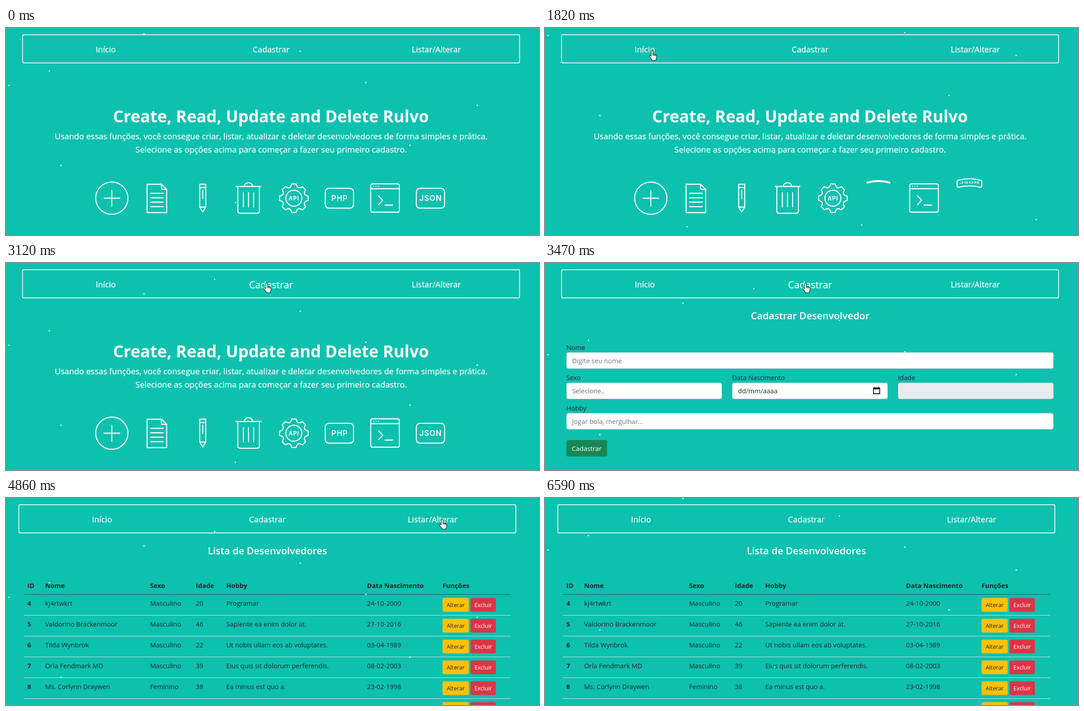
Write an HTML page that moves like this. It is 1199 by 467 pixels and loops after 6.66 s.

```html
<!DOCTYPE html>
<html lang="pt-BR">
<head>
<meta charset="utf-8">
<title>CRUD</title>
<style>
  html, body { margin: 0; width: 100%; height: 100%; overflow: hidden; background: #0dc1af; }
  svg { display: block; width: 100%; height: 100%; }
  text { font-family: "Open Sans", "Noto Sans", sans-serif; font-size: 14.75px; fill: #212529; }
  .nav, .lead { font-size: 18.45px; fill: #fff; stroke: #fff; stroke-width: .25px; }
  .nav { font-size: 18.2px; }
  .big { font-size: 36.9px; font-weight: 700; fill: #fff; }
  .head { font-size: 21.9px; font-weight: 600; fill: #fff; }
  .bold { font-weight: 700; }
  .hint { fill: #6c757d; }
  .light { fill: #fff; }
  .small { font-size: 12.9px; }
  .mid { text-anchor: middle; }
  #icons { fill: none; stroke: #fff; stroke-width: 2.3; stroke-linecap: round; stroke-linejoin: round; }
  #icons text { font-family: Inter, Roboto, sans-serif; font-weight: 600; font-size: 17px; letter-spacing: 1px; fill: #fff; stroke: none; }
  #icons .api { font-size: 12.5px; font-weight: 700; }
</style>
</head>
<body>
<svg viewBox="0 0 1199 467">
  <rect width="1199" height="467" fill="#0dc1af"/>
  <g id="nav">
    <rect x="37.3" y="15.3" width="1118" height="63.5" rx="3" fill="none" stroke="#e6f7f5" stroke-width="1.9"/>
  </g>
  <g id="home"><g id="icons"></g></g>
  <g id="form"></g>
  <g id="list"></g>
  <g id="dots" fill="#fff"></g>
  <g id="cursor" fill="#fff" stroke="#111" stroke-width="1.1" stroke-linejoin="round">
    <path id="arrow" d="M0 0V16.5L3.8 13L6.5 19L9.2 17.8L6.6 12H11.7Z"/>
    <path id="hand" d="M-2 2q0-2 2-2t2 2v6l5.5 1.3q2.5 .5 2.5 3.2v3q0 3-1.5 4.5v2h-9v-2l-5-6q-1.500-2.200 0-3q1.500-.6 3.500 1.500zM2 8v4M4.700 9v3.500M7.300 9.500v3"/>
  </g>
</svg>
<script>
const LOOP = 6660;
const $ = id => document.getElementById(id);

function add(parent, tag, attrs = {}, content = "") {
  const el = document.createElementNS("http://www.w3.org/2000/svg", tag);
  for (const k in attrs) el.setAttribute(k, attrs[k]);
  if (content) el.textContent = content;
  parent.appendChild(el);
  return el;
}
const label = (parent, x, y, str, cls = "") => add(parent, "text", { x, y, class: cls }, str);
const box = (parent, x, y, width, height, fill, rx = 4) =>
  add(parent, "rect", { x, y, width, height, fill, rx });
const repeat = (n, fn) => Array.from({ length: n }, (_, i) => fn(i)).join("");
const clamp = v => Math.max(0, Math.min(1, v));
const smooth = v => { v = clamp(v); return v * v * (3 - 2 * v); };
const show = (el, on) => el.setAttribute("display", on ? "inline" : "none");
const move = (el, x, y) => el.setAttribute("transform", `translate(${x} ${y})`);

// Navigation
const links = ["Início", "Cadastrar", "Listar/Alterar"].map((name, i) => {
  const x = 224.5 + 371.8 * i;
  return { x, el: label($("nav"), x, 55, name, "nav mid") };
});

// Home page
const home = $("home");
label(home, 596, 213, "Create, Read, Update and Delete Rulvo", "big mid");
label(home, 596.5, 250.7, "Usando essas funções, você consegue criar, listar, atualizar e deletar desenvolvedores de forma simples e prática.", "lead mid");
label(home, 596.5, 280.5, "Selecione as opções acima para começar a fazer seu primeiro cadastro.", "lead mid");

// Icons share one evenly spaced row and are drawn around their centre
const iconX = i => 238 + 102.4 * i, ICON_Y = 384;
function icon(i, d) {
  const g = add($("icons"), "g");
  move(g, iconX(i), ICON_Y);
  add(g, "path", { d });
  return g;
}

function gearPath(teeth, r) {
  const at = (radius, turn) => {
    const a = 2 * Math.PI * turn / teeth;
    return `${radius * Math.sin(a)} ${-radius * Math.cos(a)}`;
  };
  return "M" + at(r, -.2) + repeat(teeth, i => `L${at(r, i + .2)}Q${at(r * .62, i + .5)} ${at(r, i + .8)}`) + "Z";
}

add(icon(0, "M-17.5 0h35.5M0-17.5v35.5"), "circle", { r: 36.3 });
icon(1, "M-23-31.5h32.5l11.5 11.5v52.500h-44zM9.500-31.500v11.500h11.500" + repeat(4, i => `M-15 ${10 * i - 11}h28.5`));
icon(2, "M-7-31.5h13.5v51.5l-6.7 11l-6.8-11zM-7-24h13.5M-7 20h13.5M-.3-18v19");
icon(3, "M-27.7-26.5h56M-9.2-27c1-10.5 18-10.5 19 0M-23.7-26v55q0 5 5 5h38.5q5 0 5-5v-55" +
  repeat(3, i => `M${11.5 * i - 11.2}-12.5v32`));
const api = icon(4, gearPath(8, 32.5));
add(api, "circle", { r: 18 });
label(api, 0, 4.5, "API", "api mid");
const terminal = icon(6, "M-32-21.5h64.500" + repeat(3, i => `M${5.5 * i - 25.5}-27h.1`) + "M-14.500-5.500l9.500 10l-9.500 10M0 15.500h17.500");
add(terminal, "rect", { x: -32, y: -32.5, width: 64.5, height: 64, rx: 4 });

// Badges that roll around a horizontal drum
const rolls = [["PHP", 5, 705], ["JSON", 7, 640]].map(([name, slot, start]) => {
  const g = add($("icons"), "g");
  return { g, x: iconX(slot), start, frame: add(g, "path"), word: label(g, .5, 6, name, "mid") };
});

// Registration form on a three-column grid
const form = $("form");
label(form, 596.5, 126.5, "Cadastrar Desenvolvedor", "head mid");
for (const [name, hint, col, line, span] of [
  ["Nome", "Digite seu nome", 0, 0, 3],
  ["Sexo", "Selecione..", 0, 1, 1],
  ["Data Nascimento", "dd/mm/aaaa", 1, 1, 1],
  ["Idade", "", 2, 1, 1],
  ["Hobby", "Jogar bola, mergulhar...", 0, 2, 3]
]) {
  const x = 48 + 373 * col, y = 201.5 + 68.5 * line;
  label(form, x, y - 6, name);
  box(form, x + .5, y + .5, 373 * span - 24, 36, hint ? "#fff" : "#e9ecef").setAttribute("stroke", "#ced4da");
  label(form, x + 13, y + 24, hint, col ? "" : "hint");
}
add(form, "path", { d: "M739 282h14v13h-14zM739 284h14M742 279.5v3M750 279.5v3", fill: "none", stroke: "#111", "stroke-width": 1.8 });
box(form, 48, 399.5, 91.5, 37, "#198754");
label(form, 93.8, 423.5, "Cadastrar", "light mid");

// Developer table
const list = $("list");
const columns = [["ID", 48], ["Nome", 88], ["Sexo", 324], ["Idade", 427], ["Hobby", 495.5], ["Data Nascimento", 812], ["Funções", 982]];
label(list, 588, 126.5, "Lista de Desenvolvedores", "head mid");
columns.forEach(([name, x]) => label(list, x, 203, name, "bold"));
box(list, 40, 217, 1096, 1, "#17514e", 0);

function button(x, y, width, fill, name, cls) {
  box(list, x, y, width, 31, fill, 3.5);
  label(list, x + width / 2, y + 20.5, name, "small mid " + cls);
}
[
  "4|kj4rtwkrt|Masculino|20|Programar|24-10-2000",
  "5|Valdorino Brackenmoor|Masculino|46|Sapiente ea enim dolor at.|27-10-2016",
  "6|Tilda Wynbrok|Masculino|22|Ut nobis ullam eos ab voluptates.|03-04-1989",
  "7|Orla Fendmark MD|Masculino|39|Eius quis sit dolorum perferendis.|08-02-2003",
  "8|Ms. Corlynn Draywen|Feminino|38|Ea minus est quo a.|23-02-1998",
  ""
].forEach((line, i) => {
  const y = 47 * i;
  line.split("|").forEach((cell, c) => label(list, columns[c][1], 243 + y, cell, c ? "" : "bold"));
  box(list, 40, 264 + y, 1096, 1, "#dee2e6", 0);
  button(982, 225.5 + y, 59, "#ffc107", "Alterar", "");
  button(1045, 225.5 + y, 57, "#dc3545", "Excluir", "light");
});

// Rising dots: a loose upper row and an evenly spaced lower one
const SPEED = 0.0617;
const upper = [[7, 224], [97.5, 191.5], [310.5, 108], [469.5, 75.5], [662, 147], [809.5, 217.5], [1060, 269]];
const lower = Array.from({ length: 6 }, (_, k) => {
  const wave = Math.sin(.923 * k);
  return [123.5 + 196.3 * k, k % 2 ? 648 + 9 * wave : 404.5 + 87 * wave];
});
const dots = [...upper, ...lower].map(([cx, y]) => ({ y, el: add($("dots"), "circle", { cx, r: 1.5 }) }));

// Page loads: home (begun before the loop), home again, form, list
const loads = [-1532, 2496, 3190, 4860];
const pages = [home, home, form, list];

// Pointer stops; it glides from one to the next
const stops = [
  { from: 0, to: 680, x: 610, y: 490 },
  { from: 1190, to: 1190, x: 474, y: 243 },
  { from: 1740, to: 2400, x: 241, y: 51, link: 0 },
  { from: 2800, to: 3840, x: 586, y: 45, link: 1 },
  { from: 3880, to: 4600, x: 972, y: 54, link: 2 },
  { from: 4860, to: 5400, x: 981, y: 48, link: 2 },
  { from: 6300, to: LOOP, x: 1190, y: 490 }
];

function pointerAt(t) {
  const i = stops.findIndex(s => t <= s.to), b = stops[i], a = stops[i - 1] || b;
  const u = i ? clamp((t - a.to) / (b.from - a.to)) : 1;
  return [a.x + (b.x - a.x) * u, a.y + (b.y - a.y) * u];
}

const hover = (i, t) => Math.max(...stops.map(s =>
  s.link === i ? smooth((t - s.from) / 300) - smooth((t - s.to) / 300) : 0));

// One bent edge of a badge, drawn left to right or back
const bend = (half, end, middle) => `${-half} ${end}Q0 ${middle} ${half} ${end}`;

function drawRoll({ g, x, start, frame, word }, t) {
  const turn = Math.PI * (1 - Math.cos(Math.PI * clamp((t - start) / 1660)));
  const s = Math.sin(turn), c = Math.cos(turn);
  show(g, c > 0);
  const scale = 1 - .2 * (1 - c), w = 31.8 * scale, h = Math.max(0, 22.4 * c);
  const rx = 9.5 * Math.max(0, c), b = 3.5 * s, end = -b / 2, mid = 1.5 * b;
  const ry = Math.min(rx, h), top = end - h, low = end + h, W = w - rx;
  move(g, x, ICON_Y + 36 * s - (1 - c));
  frame.setAttribute("d", `M${bend(W, top, mid - h)}Q${w} ${top} ${w} ${top + ry}V${low - ry}` +
    `Q${w} ${low} ${W} ${low}Q0 ${mid + h} ${-W} ${low}Q${-w} ${low} ${-w} ${low - ry}V${top + ry}Q${-w} ${top} ${-W} ${top}Z`);
  word.setAttribute("transform", `translate(0 ${b / 4}) scale(${scale} ${c})`);
}

function draw(t) {
  const n = loads.findLastIndex(start => start <= t), page = pages[n];
  for (const p of [home, form, list]) show(p, p === page);
  const shift = page === list ? -8.4 : 0;
  move($("nav"), shift, 0);

  links.forEach(({ el }, i) => {
    const k = hover(i, t);
    el.style.fontSize = 18.2 * (1 + .2 * k) + "px";
    el.setAttribute("y", 55 + 1.7 * k);
  });

  for (const d of dots) d.el.setAttribute("cy", d.y - SPEED * (t - loads[n]));
  for (const r of rolls) drawRoll(r, t);
  move(terminal, iconX(6), ICON_Y + 4 * Math.sin(Math.PI * clamp((t - 900) / 580)));

  const [x, y] = pointerAt(t);
  const over = y < 79 && links.some(l => Math.abs(x - l.x - shift) < 70);
  move($("cursor"), x, y);
  show($("hand"), over);
  show($("arrow"), !over);
}

const begin = performance.now();
function tick() {
  draw((performance.now() - begin) % LOOP);
  requestAnimationFrame(tick);
}
tick();
</script>
</body>
</html>
```
